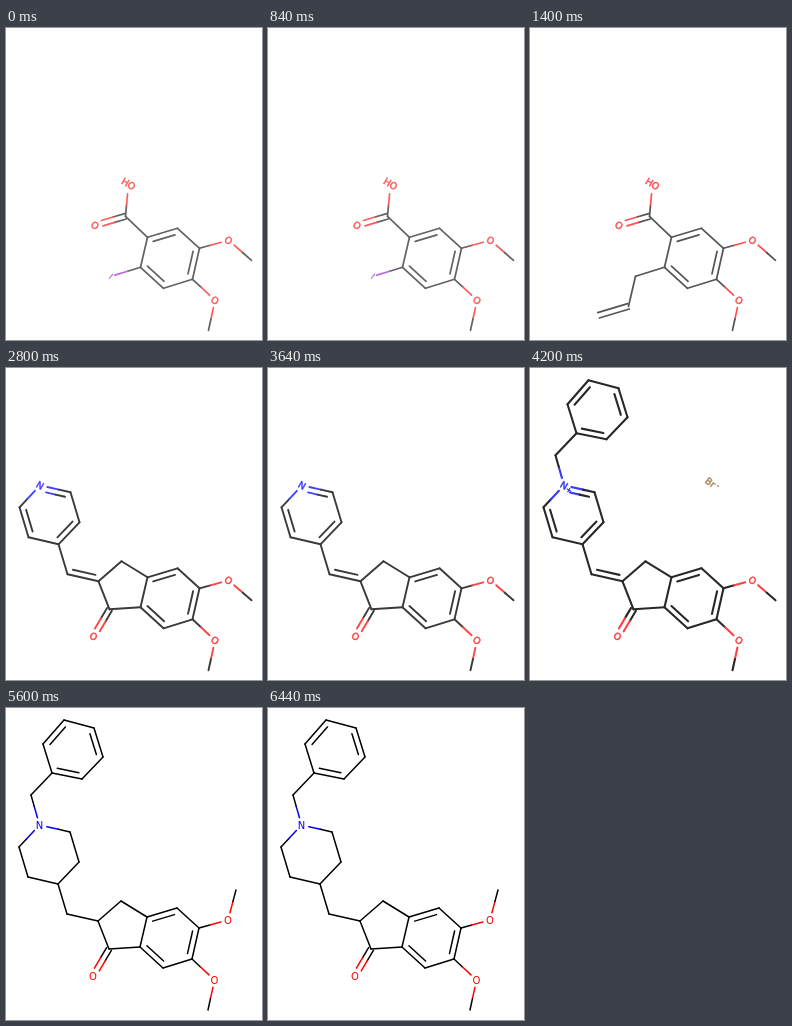
Recreate the animation shown at these times as an HTML page with a canvas. Size 256 px wide and 312 px high, loop 7000 ms.

```html
<!DOCTYPE html>
<html lang="en">
<head>
<meta charset="utf-8">
<title>Synthesis steps</title>
<style>
  html, body { margin: 0; width: 100%; height: 100%; overflow: hidden; background: #fff; }
  canvas { display: block; }
</style>
</head>
<body>
<canvas id="stage" width="256" height="312"></canvas>
<script>
const canvas = document.getElementById('stage');
const ctx = canvas.getContext('2d');
const HOLD = 1400;

// One letter per atom: x, y and, for labelled atoms, the text
const atoms = {
  a: [141, 209], b: [171, 200], c: [193, 220], d: [186, 251], e: [157, 260], f: [134, 239],
  g: [222, 212, 'O'], h: [245, 232], i: [208.5, 272, 'O'], j: [202, 302], N: [230, 182],
  k: [119, 188], l: [88.5, 197, 'O'], m: [122, 155.5, 'HO'], n: [104.5, 248, 'I'],
  p: [105, 248], q: [98, 278], r: [68, 287],
  s: [115, 193], t: [92, 213], u: [103, 241], v: [87, 268, 'O'], w: [61, 206],
  A: [52, 176], B: [22, 169], C: [13, 139], D: [33.5, 117, 'N'], E: [64, 124], F: [73, 154],
  G: [25, 87], H: [46, 65], I: [37, 36], J: [58, 12], K: [88, 20], L: [97, 49], M: [76, 71]
};

// Bonds: "ab" single, "ab=" centred double, "abx" double with its second line towards x
const arene = 'abd bc cda de efb fa cg di ij ';
const acid = arene + 'gh ak kl= km ';
const indanone = arene + 'as st tu uf uv= ';
const pyridine = 'gh twA wA AB BCE CD DEB EF FAC ';
const benzyl = 'DG GH HI IJL JK KLH LM MHJ ';

const steps = [
  { bonds: acid + 'fn', ink: '#626262', red: '#ff5c5c', width: 1.7, soft: true },
  { bonds: acid + 'fp pq qr=', ink: '#545454', red: '#ff5050', width: 1.7, soft: true },
  { bonds: indanone + pyridine, ink: '#3a3a3a', red: '#ff4444', blue: '#4444ff', width: 1.9, soft: true },
  { bonds: indanone + pyridine + benzyl, ink: '#282828', red: '#ff4040', blue: '#3838ff', width: 2.1, soft: true, salt: true },
  { bonds: indanone + benzyl + 'gN tw wA AB BC CD DE EF FA', ink: '#000', red: '#f00', blue: '#00f', width: 1.5 }
];

function colour(atom, step) {
  return { O: step.red, HO: step.red, N: step.blue, I: '#b868e4' }[atom[2]] || step.ink;
}

function line(x1, y1, x2, y2, style) {
  ctx.strokeStyle = style;
  ctx.beginPath();
  ctx.moveTo(x1, y1);
  ctx.lineTo(x2, y2);
  ctx.stroke();
}

function drawBond(code, step) {
  const [p, q] = [atoms[code[0]], atoms[code[1]]];
  const dx = q[0] - p[0], dy = q[1] - p[1], len = Math.hypot(dx, dy);
  const ux = dx / len, uy = dy / len;
  const gap = atom => atom[2] === 'HO' ? 10 : atom[2] === 'I' ? 4 : atom[2] ? 7.5 : 0;

  function strand(offset, trim) {
    const at = s => [p[0] + ux * s - uy * offset, p[1] + uy * s + ux * offset];
    const start = Math.max(gap(p), trim), end = len - Math.max(gap(q), trim);
    const from = colour(p, step), to = colour(q, step);
    if (from === to) return line(...at(start), ...at(end), from);
    const middle = (start + end) / 2;
    line(...at(start), ...at(middle), from);
    line(...at(middle), ...at(end), to);
  }

  if (code[2] === '=') {
    strand(-2.8, 0);
    strand(2.8, 0);
    return;
  }
  strand(0, 0);
  if (code[2]) {
    const r = atoms[code[2]];
    const side = Math.sign(dx * (r[1] - p[1]) - dy * (r[0] - p[0]));
    strand(side * 5.6, 4.3);
  }
}

function label(text, x, y, style, tilt, size, stroke) {
  ctx.save();
  ctx.translate(x, y);
  ctx.rotate(tilt * Math.PI / 180);
  ctx.font = `${size}px "DejaVu Sans", sans-serif`;
  ctx.fillStyle = ctx.strokeStyle = style;
  ctx.lineWidth = stroke;
  ctx.fillText(text, 0, size * 0.365);
  if (stroke) ctx.strokeText(text, 0, size * 0.365);
  ctx.restore();
}

function draw(step) {
  canvas.style.filter = step.soft ? 'blur(0.4px)' : 'none';
  ctx.fillStyle = '#fff';
  ctx.fillRect(0, 0, 256, 312);
  ctx.save();
  if (step.soft) ctx.translate(0.5, 0.3);
  ctx.lineWidth = step.width;
  ctx.lineCap = 'round';
  ctx.textAlign = 'center';
  const codes = step.bonds.trim().split(/\s+/);
  codes.forEach(code => drawBond(code, step));

  const used = new Set(codes.flatMap(code => [code[0], code[1]]));
  for (const key of used) {
    const [x, y, text] = atoms[key];
    if (!text) continue;
    const style = colour(atoms[key], step);
    if (text === 'I') label(text, x, y, style, 40, 8, 0.3);
    else if (step.soft) label(text, x, y, style, 30, 9.5, 0.5);
    else label(text, x, y, style, 0, 10, 0);
  }
  if (step.salt) {
    label('+', 38.5, 121.5, step.blue, 30, 7, 0.5);
    label('Br', 180, 114, '#b08860', 35, 9.5, 0.5);
    label('-', 188, 117, '#b08860', 35, 7, 0.5);
  }
  ctx.restore();
}

function tick() {
  draw(steps[Math.floor(performance.now() / HOLD) % steps.length]);
  requestAnimationFrame(tick);
}
tick();
</script>
</body>
</html>
```
